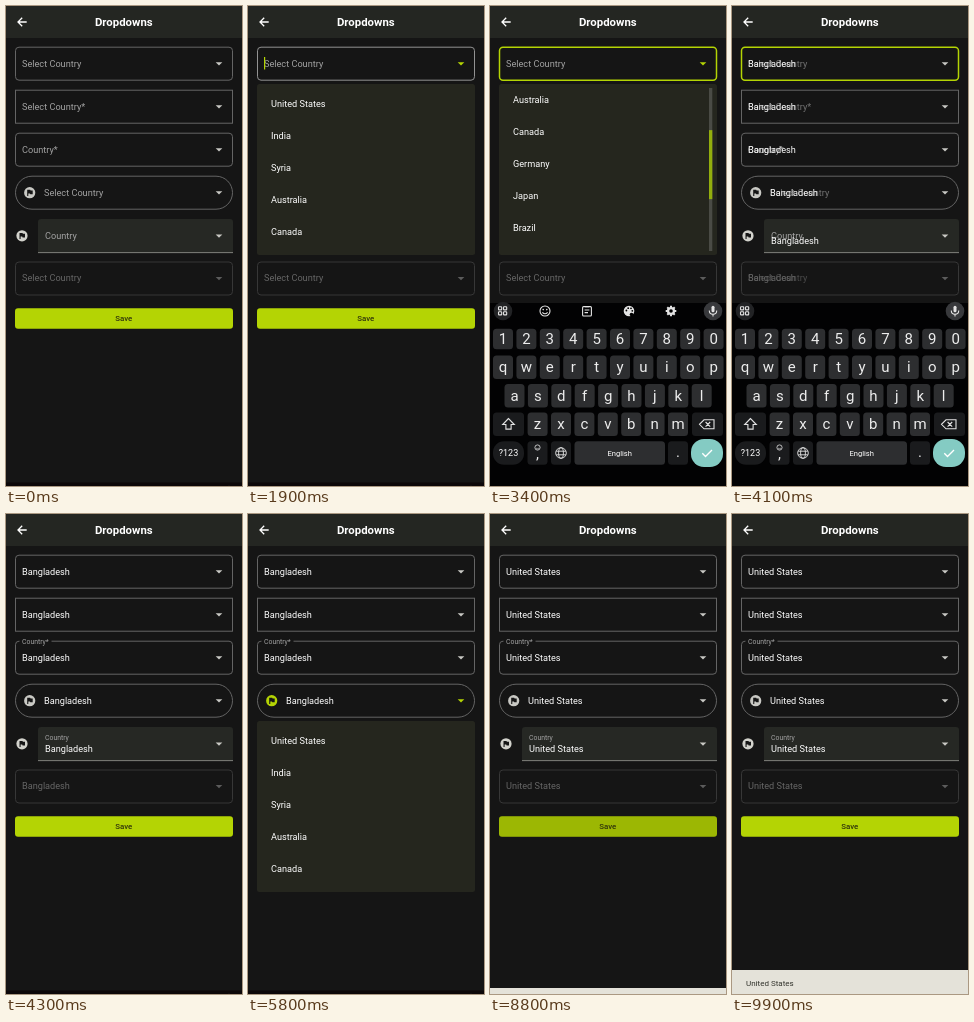
An HTML page that plays this animation: 236x480 px, repeating every 10000 ms.

```html
<!DOCTYPE html>
<html lang="en">
<head>
<meta charset="utf-8">
<title>Dropdowns</title>
<style>
html, body { margin: 0; width: 100%; height: 100%; overflow: hidden; background: #151515; }
svg { overflow: hidden; }
#stage { display: block; width: 236px; height: 480px; }
text { font-family: Roboto, sans-serif; font-size: 9.17px; fill: #fff; }
.mid { text-anchor: middle; }
.dim { fill: #a3a3a3; }
.box { fill: none; stroke: #656565; }
.line { fill: none; stroke: #e3e3e3; stroke-width: 1.1; }
.arrow { fill: #c9c9c4; }
.badge { fill: #d2d2cc; }
.off text { fill: #666; }
.off .box { stroke: #373737; }
.off .arrow { fill: #5c5c5c; }
.key { fill: #2d2e30; }
.key.dark { fill: #1a1b1d; }
.glyph { font-size: 15px; fill: #ededed; }

/* One percent of the loop is 100 ms. */
[class*="a-"] { animation: 10s step-end infinite; }
.a-hint { animation-name: hint; }
.a-first { animation-name: first; }
.a-second { animation-name: second; }
.a-float { animation-name: float; }
.a-notch { animation-name: notch; }
.a-border1 { animation-name: border1; }
.a-border4 { animation-name: border4; }
.a-tint1 { animation-name: tint1; }
.a-tint4 { animation-name: tint4; }
.a-caret { animation-name: caret; }
.a-menu1 { animation-name: menu1; }
.a-menu4 { animation-name: menu4; }
.a-bar1 { animation-name: bar1; }
.a-bar4 { animation-name: bar4; }
.a-list { animation-name: list; }
.a-thumb { animation-name: thumb; }
.a-tap { animation-name: tap; }
.a-keys { animation-name: keys; }
.a-tools { animation-name: tools; }
.a-press { animation-name: press; }
.a-snack { animation-name: snack; }
.a-snacktext { animation-name: snacktext; }

@keyframes hint { 0% { opacity: 1 } 41% { opacity: .65 } 42% { opacity: .2 } 43%, 100% { opacity: 0 } }
@keyframes first { 0% { opacity: 0 } 41% { opacity: 1 } 69%, 100% { opacity: 0 } }
@keyframes second { 0% { opacity: 0 } 69%, 100% { opacity: 1 } }
@keyframes float {
  0% { transform: none }
  42% { transform: translateY(calc(var(--rise) * .7)) scale(.82) }
  43%, 100% { transform: translateY(var(--rise)) scale(.75) }
}
@keyframes notch { 0% { opacity: 0 } 42%, 100% { opacity: 1 } }
@keyframes border1 {
  0% { stroke: #656565; stroke-width: 1px }
  19% { stroke: #929292; stroke-width: 1px }
  20% { stroke: #a1bd12; stroke-width: 1.4px }
  21% { stroke: #b4d404; stroke-width: 1.5px }
  42% { stroke: #869524; stroke-width: 1.2px }
  43%, 100% { stroke: #656565; stroke-width: 1px }
}
@keyframes border4 {
  0% { stroke: #656565; stroke-width: 1px }
  59% { stroke: #95a923; stroke-width: 1.3px }
  60% { stroke: #b4d404; stroke-width: 1.5px }
  70% { stroke: #9bb218; stroke-width: 1.3px }
  71% { stroke: #7a843c; stroke-width: 1.1px }
  72%, 100% { stroke: #656565; stroke-width: 1px }
}
@keyframes tint1 { 0% { fill: #c9c9c4 } 19% { fill: #b4d404 } 41%, 100% { fill: #c9c9c4 } }
@keyframes tint4 { 0% { fill: #c9c9c4 } 58% { fill: #b4d404 } 69%, 100% { fill: #c9c9c4 } }
@keyframes caret { 0% { opacity: 0 } 19% { opacity: 1 } 24% { opacity: 0 } 29% { opacity: 1 } 34% { opacity: 0 } 39% { opacity: 1 } 41%, 100% { opacity: 0 } }
@keyframes menu1 { 0% { visibility: hidden } 19% { visibility: visible } 41%, 100% { visibility: hidden } }
@keyframes menu4 { 0% { visibility: hidden } 58% { visibility: visible } 69%, 100% { visibility: hidden } }
@keyframes bar1 { 0% { opacity: 0 } 20% { opacity: .3 } 21% { opacity: .6 } 22% { opacity: .9 } 23%, 100% { opacity: 1 } }
@keyframes bar4 { 0% { opacity: 0 } 59% { opacity: .25 } 60% { opacity: .55 } 61% { opacity: .85 } 62%, 100% { opacity: 1 } }
@keyframes list {
  0% { transform: none }
  29% { transform: none; animation-timing-function: ease-in-out }
  39%, 100% { transform: translateY(-200px) }
}
@keyframes thumb {
  0% { transform: none }
  29% { transform: none; animation-timing-function: ease-in-out }
  39%, 100% { transform: translateY(84px) }
}
@keyframes tap { 0% { opacity: 0 } 40% { opacity: .1 } 41%, 100% { opacity: 0 } }
@keyframes keys {
  0% { transform: translateY(184px) }
  20% { transform: translateY(160px) }
  21% { transform: translateY(96px) }
  22% { transform: translateY(40px) }
  23% { transform: translateY(9px) }
  24% { transform: none }
  42% { transform: translateY(105px) }
  43%, 100% { transform: translateY(184px) }
}
@keyframes tools { 0% { opacity: 1 } 41%, 100% { opacity: 0 } }
@keyframes press {
  0% { opacity: 0 } 1% { opacity: .04 } 2% { opacity: 0 }
  87% { opacity: .1 } 88% { opacity: .13 } 89% { opacity: .1 } 90% { opacity: .05 } 91%, 100% { opacity: 0 }
}
@keyframes snack {
  0% { transform: translateY(24px) }
  88% { transform: translateY(18px) }
  89% { transform: translateY(7px) }
  90% { transform: translateY(1px) }
  91%, 100% { transform: none }
}
@keyframes snacktext { 0% { opacity: 0 } 90% { opacity: .4 } 91% { opacity: .8 } 92%, 100% { opacity: 1 } }
</style>
</head>
<body>
<svg id="stage" viewBox="0 0 236 480"></svg>
<script>
const LIME = '#b4d404';
const COUNTRIES = ['United States', 'India', 'Syria', 'Australia', 'Canada', 'Germany',
  'Japan', 'Brazil', 'France', 'Egypt', 'Bangladesh', 'Nepal'];

const text = (x, y, s, cls = '', extra = '') =>
  `<text x="${x}" y="${y}" class="${cls}" ${extra}>${s}</text>`;
const rect = (x, y, w, h, r, cls, extra = '') =>
  `<rect x="${x}" y="${y}" width="${w}" height="${h}" rx="${r}" class="${cls}" ${extra}/>`;
const path = (d, cls = 'line', extra = '') => `<path d="${d}" class="${cls}" ${extra}/>`;
const circle = (x, y, r, fill) => `<circle cx="${x}" cy="${y}" r="${r}" fill="${fill}"/>`;

const arrow = (y, cls = '') => path(`M209.7 ${y - 1.3}h6.6l-3.3 3.3z`, 'arrow ' + cls);
const flag = (x, y, cls = '') => `<circle cx="${x}" cy="${y}" r="5.6" class="badge ${cls}"/>` +
  path(`M${x - 2.5} ${y + 3.3}v-6.2h3l.4 .8h2.1v3.7h-2.4l-.4 -.8h-1.6v2.5z`, '', 'fill="#151515"');
const values = (x, y) => text(x, y, 'Bangladesh', 'a-first') + text(x, y, 'United States', 'a-second');
const hint = (x, y, s) => text(x, y, s, 'dim a-hint');
const label = (x, y, s, rise) =>
  `<g transform="translate(${x} ${y})">${text(0, 0, s, 'dim a-float', `style="--rise:${rise}px"`)}</g>`;
const outline = (y, r, cls = '') => rect(9.5, y - 16.5, 217, 33, r, 'box ' + cls);

function form() {
  return outline(57.7, 3.5, 'a-border1') + hint(16, 60.6, 'Select Country') + values(16, 60.6) +
    arrow(57.5, 'a-tint1') + rect(16, 51, 1.2, 12.5, 0, 'a-caret', `fill="${LIME}"`) +
    outline(100.7, 0) + hint(16, 103.6, 'Select Country*') + values(16, 103.6) + arrow(100.5) +
    outline(143.7, 3.5) + rect(13.5, 126, 32, 2.4, 0, 'a-notch', 'fill="#151515"') +
    label(16, 146.7, 'Country*', -17.2) + values(16, 146.7) + arrow(143.6) +
    outline(186.7, 16.5, 'a-border4') + flag(23.7, 186.7, 'a-tint4') +
    hint(38, 189.7, 'Select Country') + values(38, 189.7) + arrow(186.6, 'a-tint4') +
    flag(16, 229.8) + path('M32 247v-31q0-3 3-3h189q3 0 3 3v31z', '', 'fill="#262824"') +
    rect(32, 246.3, 195, .8, 0, '', 'fill="#969691"') +
    label(39, 232.9, 'Country', -7.4) + values(39, 237.5) + arrow(229.7) +
    `<g class="off">${outline(272.5, 3.5)}${hint(16, 275.4, 'Select Country')}${values(16, 275.4)}${arrow(272.3)}</g>` +
    rect(9, 302.3, 218, 20.5, 3, '', `fill="${LIME}"`) + rect(9, 302.3, 218, 20.5, 3, 'a-press') +
    text(117.8, 315.3, 'Save', 'mid', 'style="font-size:7.9px;font-weight:500;fill:#30350c"');
}

function menu(top, n, scrolls) {
  const move = name => scrolls ? name : '';
  const items = COUNTRIES.map((c, i) => text(14, 23.4 + 32 * i, c)).join('');
  const tap = scrolls ? rect(0, 324, 218, 32, 0, 'a-tap', 'fill="#fff"') : '';
  return `<g class="a-menu${n}">${rect(9, top, 218, 171, 2.5, '', 'fill="#25261e"')}
    <svg x="9" y="${top}" width="218" height="171">
      <g class="${move('a-list')}">${tap}${items}</g>
      <g class="a-bar${n}">${rect(210, 4, 3.3, 163, 0, '', 'fill="#4a4b45"')}
        ${rect(210, 4, 3.3, 69, 0, move('a-thumb'), 'fill="#93ae0d"')}</g>
    </svg></g>`;
}

function keyboard() {
  const row = (chars, x0, y, h) => [...chars].map((c, i) => {
    const x = x0 + i * 23.4;
    return rect(x - 10, y - h / 2, 20, h, 3.5, 'key') + text(x, y + 5, c, 'glyph mid');
  }).join('');
  const dark = (x, y, w, r = 3.5) => rect(x, y - 11.7, w, 23.4, r, 'key dark');
  const squares = [[9, 301], [14, 301], [9, 306], [14, 306]]
    .map(([x, y]) => rect(x - .5, y - .3, 3.2, 3.2, .7, 'line')).join('');
  const spokes = Array.from({ length: 8 }, (_, i) =>
    path('M181 299.7v2', 'line', `style="stroke-width:2" transform="rotate(${i * 45} 181 305)"`)).join('');
  const dots = [[136.4, 304.5], [138.2, 302.2], [141, 302.3], [142.3, 304.8]]
    .map(([x, y]) => circle(x, y, .9, '#000')).join('');
  const tools = '<g class="a-tools">' +
    '<circle cx="55" cy="305" r="5" class="line"/>' + circle(53.2, 303.6, .8, '#e3e3e3') +
    circle(56.8, 303.6, .8, '#e3e3e3') + path('M52.4 306.3q2.6 3 5.2 0') +
    rect(92.6, 300.6, 8.8, 9.4, 1, 'line') + path('M95 300.6h4M94.6 304h4.8M94.6 306.6h3.4') +
    circle(139, 305, 5.3, '#e3e3e3') + dots + circle(141.5, 308.6, 1.8, '#000') +
    circle(181, 305, 4.1, '#e3e3e3') + spokes + circle(181, 305, 1.8, '#000') + '</g>';
  return '<g class="a-keys">' + rect(0, 297, 236, 183, 0, '', 'fill="#020203"') +
    circle(13, 305, 9.3, '#222325') + squares + tools +
    circle(223, 305, 9.3, '#38393c') + rect(221.5, 299.8, 3, 6.4, 1.5, '', 'fill="#e3e3e3"') +
    path('M219.3 304.6q0 3.8 3.7 3.8t3.7 -3.8M223 308.4v2') +
    row('1234567890', 13, 333, 20.5) + row('qwertyuiop', 13, 361.2, 23.4) +
    row('asdfghjkl', 24.5, 389.7, 23.4) + row('zxcvbnm', 47.6, 418.3, 23.4) +
    dark(3, 418.3, 31) + path('M18.5 412.5l-5.8 6h3.2v4.6h5.2v-4.6h3.2z') +
    dark(202, 418.3, 31) + path('M214 413.8h10v9h-10l-4.5 -4.5zM215.6 416l4.6 4.6M220.2 416l-4.6 4.6') +
    dark(3, 447, 31, 11) + text(18.5, 450.2, '?123', 'mid', 'style="font-size:9px"') +
    dark(37.5, 447, 20) + text(47.5, 453, ',', 'glyph mid') +
    '<circle cx="47.5" cy="441.5" r="2.6" class="line" style="stroke-width:.8"/>' +
    path('M46.2 442.2q1.3 1.3 2.6 0', 'line', 'style="stroke-width:.7"') +
    dark(61, 447, 20) + '<circle cx="71" cy="447" r="5.3" class="line" style="stroke-width:.9"/>' +
    '<ellipse cx="71" cy="447" rx="2.4" ry="5.3" class="line" style="stroke-width:.9"/>' +
    path('M66.2 445.2h9.6M66.2 448.8h9.6', 'line', 'style="stroke-width:.9"') +
    rect(84.5, 435.3, 90.5, 23.4, 3.5, 'key') + text(129.7, 450, 'English', 'mid', 'style="font-size:7.6px"') +
    dark(178, 447, 20) + text(188, 451, '.', 'glyph mid') +
    rect(201, 433, 32, 28, 13, '', 'fill="#84cbc3"') +
    path('M212.3 447.2l3.2 3.2 6.5 -6.5', 'line', 'style="stroke:#fff;stroke-width:1.4"') + '</g>';
}

document.getElementById('stage').innerHTML =
  rect(0, 0, 236, 480, 0, '', 'fill="#151515"') +
  rect(0, 476.5, 236, 3.5, 0, '', 'fill="#0c0709"') +
  rect(0, 0, 236, 32, 0, '', 'fill="#242622"') +
  path('M20.7 16h-8.6M16.2 11.8l-4.2 4.2 4.2 4.2', 'line', 'style="stroke:#fff;stroke-width:1.3"') +
  text(117.8, 20, 'Dropdowns', 'mid', 'style="font-size:11.4px;font-weight:700"') +
  form() + menu(78, 1, true) + menu(207, 4, false) + keyboard() +
  '<g class="a-snack">' + rect(0, 456, 236, 24, 0, '', 'fill="#e4e2d9"') +
  text(14, 471.6, 'United States', 'a-snacktext', 'style="font-size:8px;fill:#32332c"') + '</g>';
</script>
</body>
</html>
```
